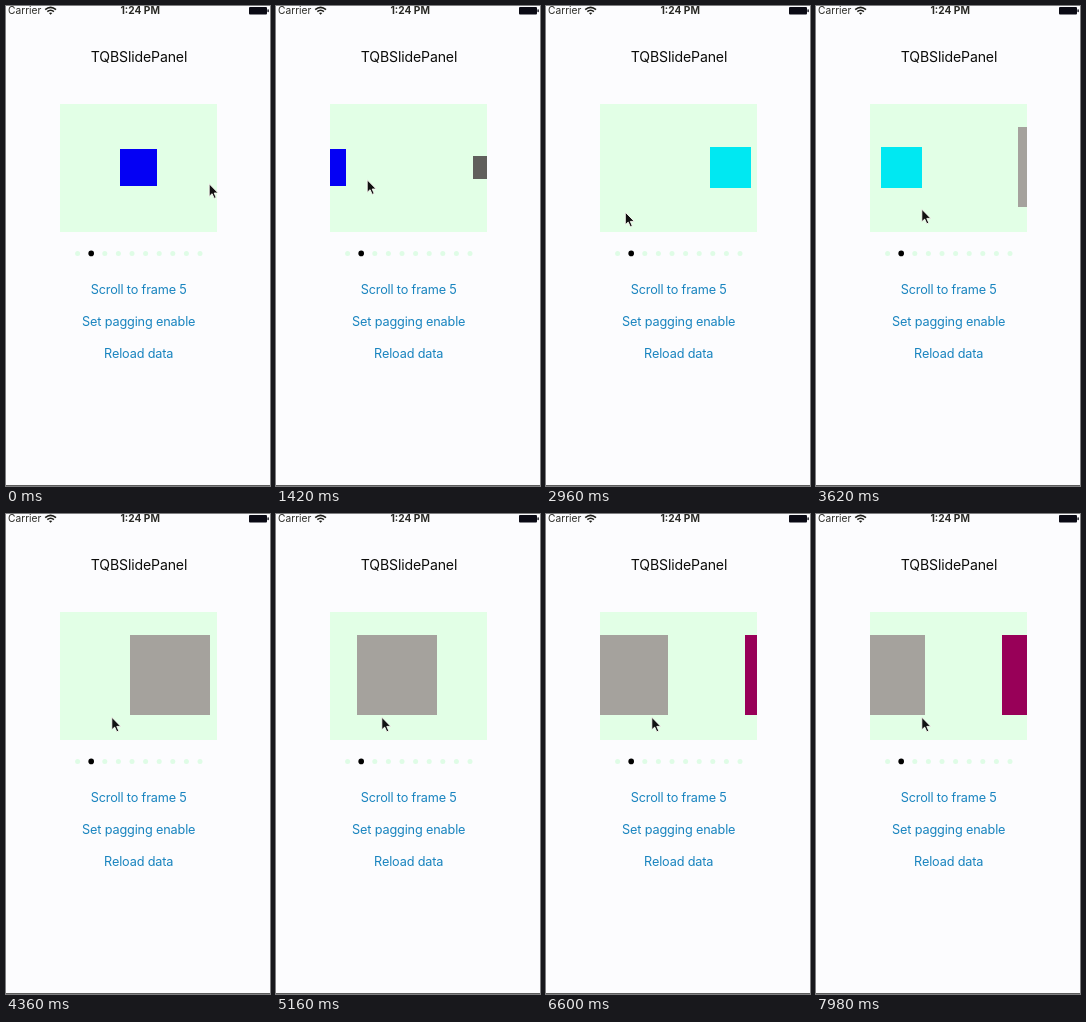
These frames come from a looping animation (264x480 px, 8000 ms). An HTML page:

```html
<!DOCTYPE html>
<html lang="en">
<head>
<meta charset="utf-8">
<title>Scroll view</title>
<style>
  html, body { margin: 0; width: 100%; height: 100%; overflow: hidden; background: #fcfcfe; }
  svg { display: block; width: 100vw; height: 100vh; }
  text { font-family: Inter, Roboto, sans-serif; text-anchor: middle; }
  .title { font-size: 14.1px; letter-spacing: -.01em; fill: #0c0c0a; }
  .link { font-size: 12.7px; letter-spacing: -.012em; fill: #1984bf; }
  .status { font-size: 10.2px; fill: #2a2a26; }
</style>
</head>
<body>
<svg viewBox="0 0 264 480" preserveAspectRatio="none">
  <defs><clipPath id="view"><rect x="54" y="98" width="157" height="128"/></clipPath></defs>
  <rect width="264" height="480" fill="#fcfcfe"/>

  <text class="status" x="2" y="8.4" style="text-anchor:start">Carrier</text>
  <g fill="none" stroke="#1c1c18" stroke-width="1.6" transform="translate(-.6 0)">
    <path d="M39.8 3.6Q45.2 -1 50.6 3.6M41.9 5.7Q45.2 2.8 48.5 5.7"/>
    <path d="M45.2 8.8L43.5 7.1Q45.2 5.7 46.9 7.1Z" fill="#1c1c18" stroke="none"/>
  </g>
  <text class="status" x="134.2" y="8.4" font-weight="700">1:24 PM</text>
  <rect x="243" y="1" width="18" height="7.5" rx="1" fill="#0a0a14"/>
  <rect x="261.4" y="3.2" width="1.4" height="3" rx=".7" fill="#0a0a14"/>

  <text class="title" x="133" y="56">TQBSlidePanel</text>
  <rect x="54" y="98" width="157" height="128" fill="#e2ffe6"/>
  <g clip-path="url(#view)"><g id="strip" shape-rendering="crispEdges"></g></g>
  <g id="dots"></g>
  <text class="link" x="132.7" y="287.6">Scroll to frame 5</text>
  <text class="link" x="132.7" y="319.8">Set pagging enable</text>
  <text class="link" x="132.7" y="352.3">Reload data</text>
  <rect y="479" width="264" height="1" fill="#5c5c5c"/>

  <path id="cursor" d="M0 0V12.6L2.9 9.9L5 14.6L7 13.7L5 9.2H9Z" fill="#111" stroke="#fbfbf4" stroke-width=".9"/>
</svg>
<script>
const LOOP = 8000, PAGE = 157, MID_X = 132.5, MID_Y = 161.4;
const pages = [
  [37, '#0400f4'], [22.5, '#605f5c'], [69, '#a5a29d'], [36, '#a29f99'],
  [41, '#00e8f2'], [80, '#a5a29d'], [80, '#980058']
];
const $ = id => document.getElementById(id);
const strip = $('strip'), cursor = $('cursor');

function add(parent, tag, attrs) {
  const el = document.createElementNS('http://www.w3.org/2000/svg', tag);
  for (const key in attrs) el.setAttribute(key, attrs[key]);
  parent.append(el);
}

pages.forEach(([size, fill], i) => add(strip, 'rect', {
  x: MID_X + i * PAGE - size / 2, y: MID_Y - size / 2, width: size, height: size, fill
}));
for (let i = 0; i < 10; i++) {
  const on = i === 1;
  add($('dots'), 'circle', {
    cx: 71.6 + i * 13.6, cy: 247.4, r: on ? 2.8 : 2.5, fill: on ? '#000' : '#dffce6'
  });
}

function tick(ms) {
  const t = ms + 20, r = t % 140;
  return 3 * Math.floor(t / 140) + (r < 20 ? 0 : r < 40 ? 1 : 2) - 1;
}

const glide = n => 856.2 - 181 * Math.exp(-0.0336 * (n - 77));

// Drag, release, then friction.
function offset(n) {
  if (n < 22) return 0;
  if (n <= 31) return 81 * ((n - 22) / 9) ** 2;
  if (n < 36) return 81 + (glide(36) - 81) * (n - 31) / 5;
  return glide(n);
}

function pointer(n) {
  if (n < 34) {
    const p = Math.max(0, (n - 18) / 13) ** 2;
    return [203.2 - 112 * p, 177.8 - 4 * p];
  }
  if (n < 58) return null;
  const q = (1 - Math.min(1, (n - 58) / 12)) ** 2;
  return [105.8 - 106 * q, 203.2 + 12 * q];
}

function draw(ms) {
  const n = tick(ms), at = pointer(n);
  strip.setAttribute('transform', `translate(${-offset(n)} 0)`);
  cursor.setAttribute('visibility', at ? 'visible' : 'hidden');
  if (at) cursor.setAttribute('transform', `translate(${at})`);
}

const start = performance.now();
function loop() {
  draw((performance.now() - start) % LOOP);
  requestAnimationFrame(loop);
}
loop();
</script>
</body>
</html>
```
